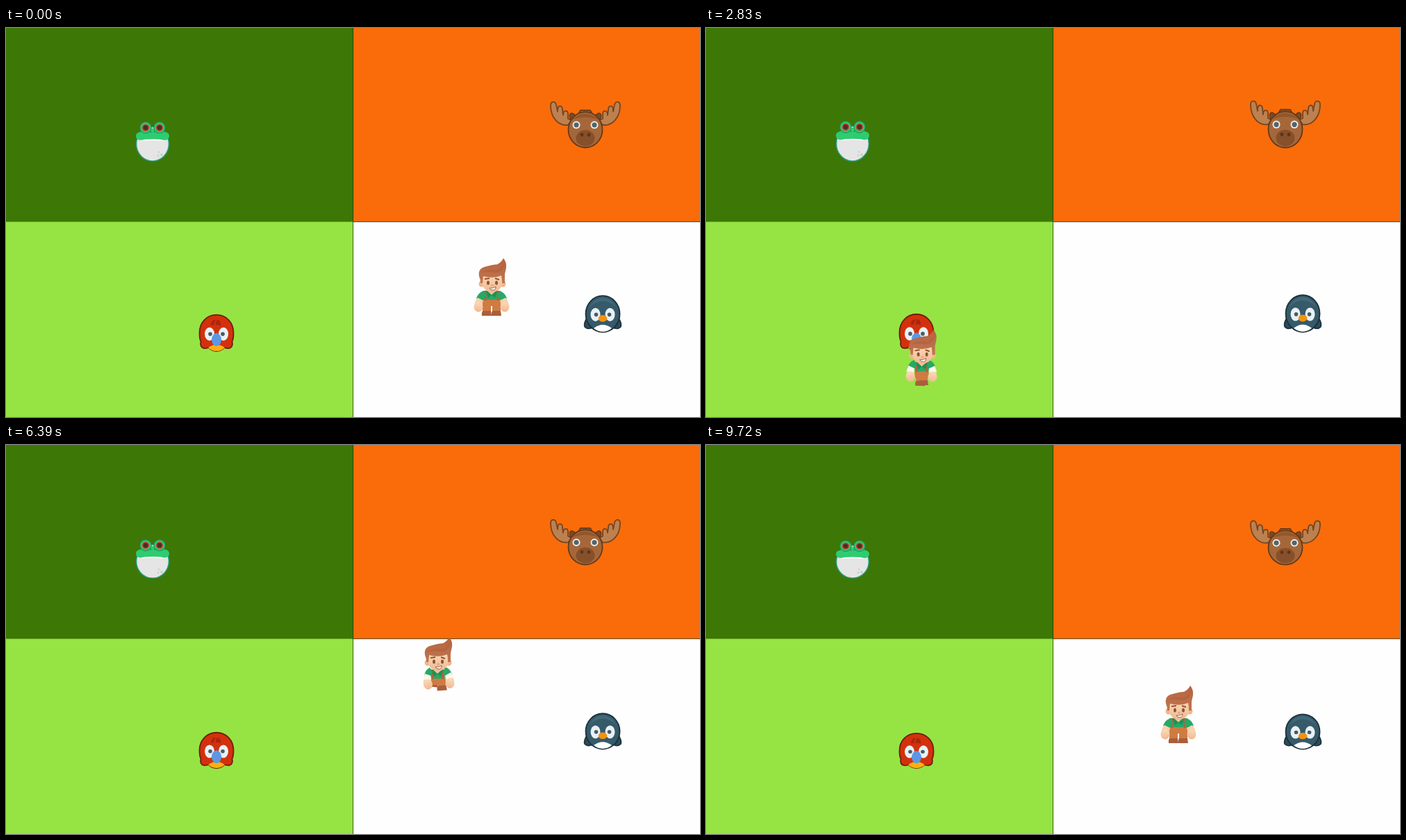
Recreate the animation shown at these times as an HTML page. Size 999x561 px, loop 9.8 s.

```html
<!DOCTYPE html>
<html lang="en">
<head>
<meta charset="utf-8">
<title>Four fields</title>
<style>
  html, body { margin: 0; width: 100%; height: 100%; overflow: hidden; }
  svg { display: block; width: 100%; height: 100%; }
  .cuff { opacity: var(--walking, 0); }
</style>
</head>
<body>
<svg viewBox="0 0 999 561" preserveAspectRatio="none">
  <defs>
    <linearGradient id="hairTone" x1="0" y1="0" x2="0" y2="1">
      <stop offset="0" stop-color="#b5643f"/><stop offset="1" stop-color="#c07650"/>
    </linearGradient>
    <linearGradient id="skinTone" x1="0" y1="0" x2="0" y2="1">
      <stop offset="0" stop-color="#fbdcb8"/><stop offset="1" stop-color="#f0b893"/>
    </linearGradient>
    <g id="antler">
      <path d="M809 140C795 142 784 129 784 112q0-5 4-5 3 0 4 4l2 10q0-8 3-8 4 0 4 5l1 8q0-6 4-6 3 0 3 5v6q3 2 6 2z"
        fill="#bd8150" stroke="#734522" stroke-width="1.8" stroke-linejoin="round"/>
      <path d="M813 133q-4-8 1-10 5 1 7 6z" fill="#7c4a24" stroke="#65391a" stroke-width="1.3"/>
    </g>
    <g id="bigEye">
      <ellipse rx="7" ry="9.5" fill="#e8f1f8"/>
      <circle r="2.8" cx="1" fill="#4d5961"/>
    </g>
    <g id="frogEye">
      <circle r="8" fill="#2ecc71" stroke="#229360" stroke-width="1.2"/>
      <circle r="5.2" fill="#c0432f"/>
      <circle r="3.4" fill="#522a20"/>
    </g>
    <g id="mooseEye">
      <circle r="5.5" fill="#f3eee8"/>
      <circle r="3.6" fill="#51656f"/>
    </g>
    <g id="leg">
      <path d="M-6-24H6V-5H-6z" fill="#cf7b42"/>
      <path d="M-6-7H6l1 7H-7q-1-4 1-7z" fill="#a95f3b"/>
    </g>
    <g id="arm">
      <path d="M-4-1Q-12 1-15 10l8 4 6-8z" fill="#28a866"/>
      <path d="M-13 9q-5 6-5 13h11l2-9z" fill="url(#skinTone)"/>
      <path class="cuff" d="M-13 6l8 5-2 6-10-3z" fill="#fdf6ee"/>
      <ellipse cx="-12" cy="22" rx="6.5" ry="7.5" fill="url(#skinTone)"/>
    </g>
  </defs>

  <path fill="#3d7705" d="M0 0h500v280H0z"/>
  <path fill="#fa6c09" d="M500 0h499v280H500z"/>
  <path fill="#96e444" d="M0 279.500h500v282H0z"/>
  <path fill="#fefefe" d="M500 279.500h499v282H500z"/>
  <path d="M499.600 0v561M500 279.500h499" stroke="#2d3314" stroke-opacity=".8"/>

  <g class="animal" data-base="192">
    <ellipse cx="211" cy="167.5" rx="23.5" ry="24.5" fill="#e5e5e5" stroke="#249a74" stroke-width="1.6"/>
    <path d="M194 162q17-2 34 0" stroke="#fff" stroke-width="2.5" fill="none"/>
    <path d="M194 150q2-5 8-5h18q6 0 8 5 7 1 7 6 0 5-6 6-4 0-6-1-12-1-24 0-2 1-6 1-6-1-6-6 0-5 7-6z" fill="#2ecc71"/>
    <use href="#frogEye" x="201" y="144"/>
    <use href="#frogEye" x="221" y="144"/>
    <g fill="#1d8a56"><circle cx="208.500" cy="150" r="1"/><circle cx="213.500" cy="150" r="1"/></g>
    <g fill="#cbcfcf"><circle cx="219" cy="184" r="1.5"/><circle cx="224" cy="183" r="2"/><circle cx="220" cy="179" r="1.3"/></g>
  </g>

  <g class="animal" data-base="173">
    <use href="#antler"/>
    <use href="#antler" transform="matrix(-1 0 0 1 1668 0)"/>
    <path d="M823 126l4-7h14l4 7z" fill="#9d602f" stroke="#65391a" stroke-width="1.8" stroke-linejoin="round"/>
    <ellipse cx="834" cy="147" rx="24.500" ry="25.500" fill="#a5673a" stroke="#65391a" stroke-width="1.8"/>
    <path d="M814 133q20-18 40 0-20-8-40 0z" fill="#925728"/>
    <use href="#mooseEye" x="821" y="140"/>
    <use href="#mooseEye" x="847" y="140"/>
    <ellipse cx="834" cy="159" rx="13.500" ry="11.500" fill="#86502a"/>
    <g fill="#5e3518"><ellipse cx="829" cy="154" rx="2.3" ry="2.6"/><ellipse cx="839" cy="154" rx="2.3" ry="2.6"/></g>
  </g>

  <g class="animal" data-base="466">
    <path d="M303 414c14 0 24.500 11 24.500 26q0 9-2 12 2 9-5 10-4 0-6-1-5 5-11.500 5t-11.500-5q-2 1-6 1-7-1-5-10-2-3-2-12c0-15 10.500-26 24.500-26z"
      fill="#d3310d" stroke="#701d0c" stroke-width="1.8"/>
    <path d="M295 429q0-8 7-8-3 4-3 8zm7 0q-1-6 3-8 5 2 4 9-3-3-7-1z" fill="#a9260c"/>
    <use href="#bigEye" x="293" y="441.500"/>
    <use href="#bigEye" transform="translate(313 441.500) scale(-1 1)"/>
    <path d="M291 461q12-9 24 0-5 5-12 5t-12-5z" fill="#fdb010"/>
    <path d="M303 440q7 2 7 10-1 8-7 9-6-1-7-9 0-8 7-10z" fill="#5a98e6"/>
  </g>

  <g class="animal" data-base="439">
    <g fill="#2b4b5a" stroke="#1c303b" stroke-width="1.600">
      <path d="M837 417q-6 9-4 14 5 5 13 0z"/><path d="M881 417q6 9 4 14-5 5-13 0z"/>
    </g>
    <ellipse cx="859" cy="412.500" rx="24.500" ry="26" fill="#365a69" stroke="#1c303b" stroke-width="1.8"/>
    <path d="M840 403q6-13 19-14 13 1 19 14-9-9-19-9t-19 9z" fill="#41697a"/>
    <use href="#bigEye" x="848.500" y="413.500"/>
    <use href="#bigEye" transform="translate(869.500 413.500) scale(-1 1)"/>
    <path d="M846 433q13-10 26 0-6 5-13 5t-13-5z" fill="#fff"/>
    <ellipse cx="859" cy="419" rx="6.300" ry="4.800" fill="#f4920e"/>
  </g>

  <g id="boy">
    <use id="legL" href="#leg"/>
    <use id="legR" href="#leg"/>
    <g id="torso">
      <g id="clothes">
        <path d="M-13-36h26l-1 14q-12 3-24 0z" fill="#28a866"/>
        <path d="M-12-23h24l1 9h-26z" fill="#cf7b42"/>
        <path d="M-9-36v14M9-36v14" stroke="#a9673a" stroke-width="3"/>
      </g>
      <g transform="translate(-7 -35)"><use id="armL" href="#arm"/></g>
      <g transform="translate(7 -35) scale(-1 1)"><use id="armR" href="#arm"/></g>
      <path d="M-7-37L0-30l7-7z" fill="#f3c196"/>
      <path d="M-9-37l9 7-5 4zM9-37l-9 7 5 4z" fill="#1f8f55"/>
      <g fill="#eeb78d"><circle cx="-14" cy="-46" r="4.500"/><circle cx="16" cy="-46" r="4.500"/></g>
      <path d="M-13-62h28v18q-3 9-14 10-11-1-14-10z" fill="url(#skinTone)"/>
      <path d="M-18-57q-2-12 10-14 10-3 16-3 6-3 9-9 5 6 4 14l-2 9v13h-4q0-7-1-11-12 5-26 1l-1 10h-3q0-6-2-10z" fill="url(#hairTone)"/>
      <path d="M-15-62q8-6 21-4 10-2 13-12-2 17-15 16-10-2-19 0z" fill="#a85937" opacity=".4"/>
      <path d="M-10-53l7-1M5-54l6 2" stroke="#97512f" stroke-width="2"/>
      <g fill="#8b5436"><ellipse cx="-5" cy="-47.500" rx="2" ry="3"/><ellipse cx="7" cy="-47.500" rx="2" ry="3"/></g>
      <ellipse cx="1" cy="-44" rx="2" ry="1.500" fill="#e8a67b"/>
      <path d="M-3-40q5 1 9-2 0 5-4 5-4 0-5-3z" fill="#fff" stroke="#9a553c" stroke-width=".9"/>
    </g>
  </g>
</svg>

<script>
const LOOP = 9800, TICK = 77.2, BREATH = 260.8, STEP = 226.5;

// Walk waypoints: time, x, y of the feet
const path = [
  [0, 699, 415], [60, 699, 415], [1920, 328, 415], [2080, 297, 415],
  [2600, 297, 516], [2915, 315, 516], [4060, 357, 287], [4310, 435, 239],
  [4640, 500, 239], [5390, 500, 390], [5980, 562, 300], [6390, 621, 354],
  [6500, 640, 366], [7450, 478, 426], [7790, 529, 426], [8560, 680, 430],
  [LOOP, 680, 430]
];

const byId = id => document.getElementById(id);
const [boy, torso, clothes, legL, legR, armL, armR] =
  ['boy', 'torso', 'clothes', 'legL', 'legR', 'armL', 'armR'].map(byId);
const animals = [...document.querySelectorAll('.animal')];
const place = (node, value) => node.setAttribute('transform', value);

function drawAnimals(t) {
  const stretch = 0.9955 + 0.034 * Math.cos(2 * Math.PI * (t / BREATH - 0.8));
  for (const animal of animals) {
    const base = +animal.dataset.base;
    place(animal, `translate(0 ${base * (1 - stretch)}) scale(1 ${stretch})`);
  }
}

function drawBoy(t) {
  const next = path.findIndex(point => point[0] > t);
  const [t0, x0, y0] = path[next - 1], [t1, x1, y1] = path[next];
  const part = (t - t0) / (t1 - t0);
  const x = x0 + (x1 - x0) * part, y = y0 + (y1 - y0) * part;
  const walking = x0 !== x1 || y0 !== y1;
  const swing = walking ? Math.sin(Math.PI * (t - 1920) / STEP) : 0;
  const spread = walking ? 1 + 8 * Math.abs(swing) : 7;
  const armLift = walking ? -4 : 0, armTurn = walking ? -8 : 0;

  boy.style.setProperty('--walking', walking ? 1 : 0);
  place(boy, `translate(${x} ${y}) scale(${x1 < x0 ? -1 : 1} 1)`);
  place(legL, `translate(${-spread} ${-7 * Math.max(0, -swing)}) rotate(${6 * Math.abs(swing)})`);
  place(legR, `translate(${spread} ${-5 * Math.max(0, swing)}) rotate(${-6 * Math.abs(swing)})`);
  place(torso, `translate(0 ${walking ? 3 - 4 * swing : 0})`);
  place(clothes, `scale(${walking ? 0.82 : 1} 1)`);
  place(armL, `translate(0 ${armLift}) rotate(${armTurn + 7 * swing})`);
  place(armR, `translate(0 ${armLift}) rotate(${armTurn - 7 * swing})`);
}

// The picture advances in held poses, one per tick
const poseTime = t => Math.max(0, 60 + TICK * Math.floor((t - 50) / TICK));

const start = performance.now();
function frame() {
  const t = poseTime((performance.now() - start) % LOOP);
  drawAnimals(t);
  drawBoy(t);
  requestAnimationFrame(frame);
}
frame();
</script>
</body>
</html>
```
